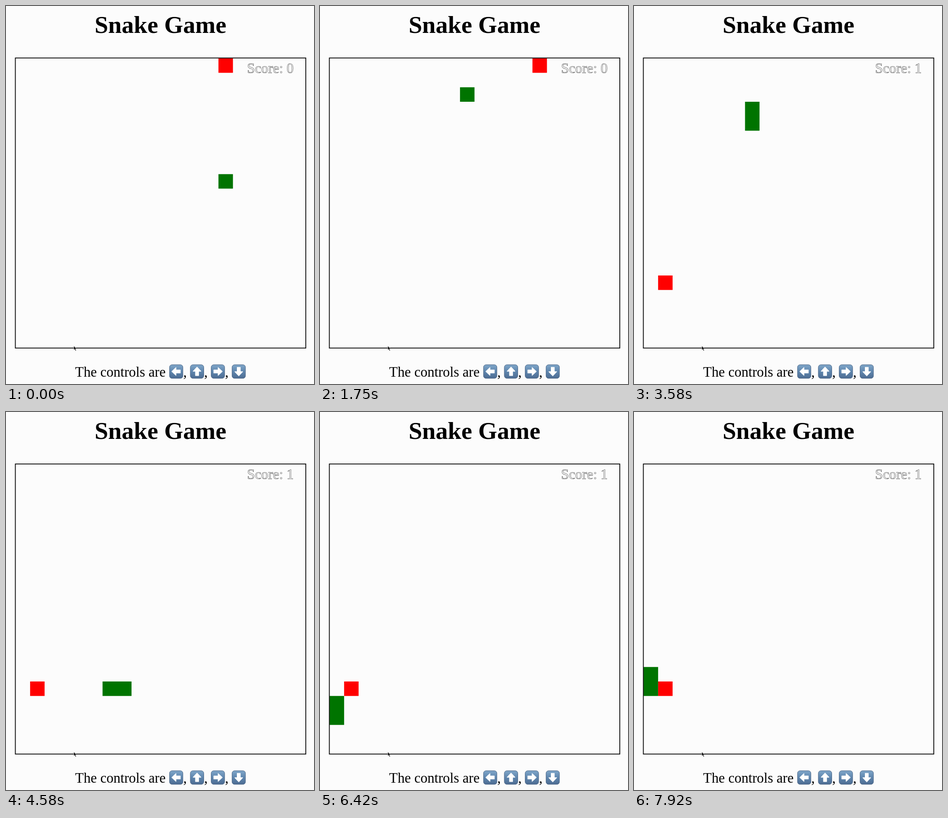
An HTML page that plays this animation: 675 px wide and 829 px high, repeating every 8 s.

```html
<!DOCTYPE html>
<html lang="en">
<head>
<meta charset="utf-8">
<title>Snake Game</title>
<style>
  html, body { margin: 0; width: 100%; height: 100%; overflow: hidden; background: #fcfcfc; }
  svg { display: block; width: 675px; height: 829px; }
  text { font-family: "Liberation Serif", "Times New Roman", serif; }
  .title { font-size: 53.3px; font-weight: bold; text-anchor: middle; }
  .help { font-size: 30.5px; }
  .score { font-size: 30.9px; fill: none; stroke: #505050; stroke-width: .7; }
</style>
</head>
<body>
<svg viewBox="0 0 675 829">
  <defs>
    <linearGradient id="keyFill" x2="0" y2="1">
      <stop offset="0" stop-color="#7fa6c9"/>
      <stop offset=".5" stop-color="#5f86ae"/>
      <stop offset="1" stop-color="#4d6c92"/>
    </linearGradient>
  </defs>
  <text class="title" x="338.5" y="59">Snake Game</text>
  <path id="food" fill="#f00"/>
  <path id="snake" fill="#007400"/>
  <rect x="20.5" y="114" width="636.5" height="636.2" fill="none" stroke="#0a0a0a" stroke-width="1.8"/>
  <text class="score" id="score" x="528.3" y="147">Score: 0</text>
  <path d="M148.5 745.5v9l2-1.9 1.8 3.7 1.6-.8-1.8-3.6h2.8z" fill="#111" stroke="#fff" stroke-width=".5"/>
  <text class="help" x="151.6" y="812.7">The controls are</text>
  <g id="keys"></g>
</svg>
<script>
const GRID = 20, CELL = 31.75, LEFT = 21.1, TOP = 114.8;
const LOOP = 8000, STEPS_PER_SECOND = 12;
const GROW_STEP = 29, STALLED_STEP = 2;
const ROUTE = 'R12 U6 R8 U4 L7 D17 L4 D8 L2 U7 L1 D19';
const DIRECTIONS = { R: [1, 0], L: [-1, 0], U: [0, -1], D: [0, 1] };

const byId = id => document.getElementById(id);

function add(parent, tag, attrs) {
  const el = document.createElementNS('http://www.w3.org/2000/svg', tag);
  for (const name in attrs) el.setAttribute(name, attrs[name]);
  return parent.appendChild(el);
}

const wrap = v => (v + GRID) % GRID;

function buildPath(start, route) {
  const path = [start];
  for (const leg of route.split(' ')) {
    const [dx, dy] = DIRECTIONS[leg[0]];
    for (let i = Number(leg.slice(1)); i > 0; i--) {
      const [x, y] = path[path.length - 1];
      path.push([wrap(x + dx), wrap(y + dy)]);
    }
  }
  return path;
}

const cellOutline = ([col, row]) =>
  `M${LEFT + col * CELL} ${TOP + row * CELL}h${CELL}v${CELL}h${-CELL}z`;

function drawCells(id, cells) {
  byId(id).setAttribute('d', cells.map(cellOutline).join(''));
}

function drawKeys() {
  for (let i = 0; i < 4; i++) {
    const x = 373 + i * 45.7;
    const key = add(byId('keys'), 'g', { transform: `translate(${x} 801.5)` });
    add(key, 'rect', { x: -14.7, y: -14.7, width: 29.4, height: 29.8, rx: 5.5,
      fill: 'url(#keyFill)', stroke: '#486384', 'stroke-width': 1 });
    add(key, 'path', { d: 'M-9.5 0L-.5-8.5V-3.4H9V3.4H-.5V8.5Z', transform: `rotate(${i * 90})`,
      fill: '#fff', stroke: '#fff', 'stroke-width': 1.4, 'stroke-linejoin': 'round' });
    if (i < 3) add(byId('keys'), 'text', { class: 'help', x: x + 15.5, y: 812.7 }).textContent = ',';
  }
}

const path = buildPath([14, 8], ROUTE);
drawKeys();

// Steps begin on times rounded to 10 ms.
const stepAt = ms => Math.floor((Math.floor(ms / 10) + .5) * STEPS_PER_SECOND / 100);

let shown = -1;
function draw(now) {
  const step = stepAt(now % LOOP);
  if (step === shown) return;
  shown = step;
  const grown = step >= GROW_STEP;
  const at = step === STALLED_STEP ? step - 1 : step;
  drawCells('snake', path.slice(grown ? at - 1 : at, at + 1));
  drawCells('food', [grown ? [1, 15] : [14, 0]]);
  byId('score').textContent = 'Score: ' + (grown ? 1 : 0);
}

const begin = performance.now();
function tick() {
  draw(performance.now() - begin);
  requestAnimationFrame(tick);
}
tick();
</script>
</body>
</html>
```
